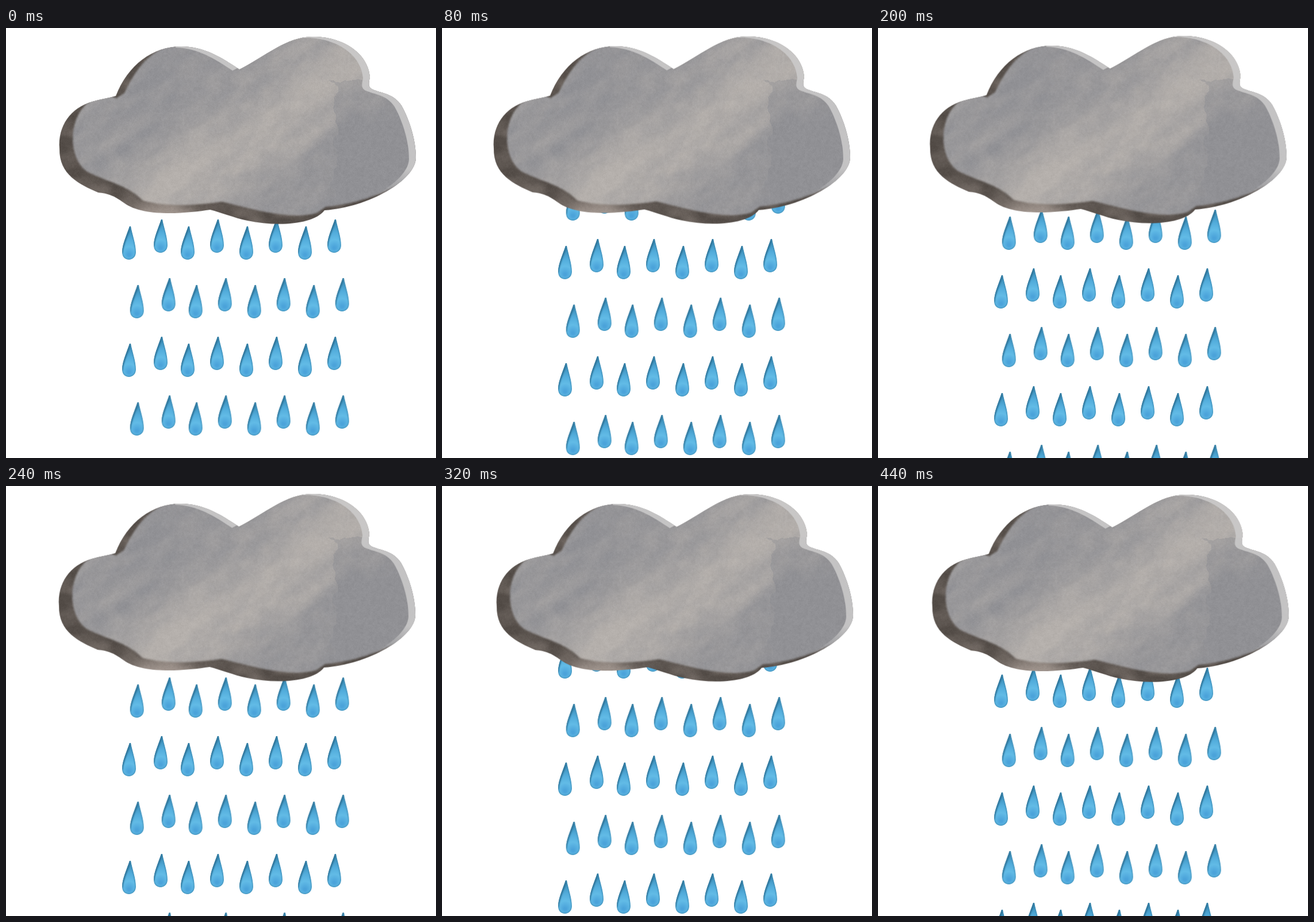
An HTML page with a canvas for the animation above (0.48 s loop, 748 by 748 pixels).

```html
<!DOCTYPE html>
<html lang="en">
<head>
<meta charset="utf-8">
<title>Rain cloud</title>
<style>
  html, body { margin: 0; width: 100%; height: 100%; overflow: hidden; background: #fff; }
  canvas { display: block; width: 748px; height: 748px; }
</style>
</head>
<body>
<canvas id="stage" width="748" height="748"></canvas>
<script>
const SIZE = 748, SKY = 360, LOOP = 480, STEP = 40, TAU = Math.PI * 2;
const ctx = document.getElementById('stage').getContext('2d');

const outline = new Path2D(`M93 210C90 170 112 139 150 128C163 124 178 122 191 118
  C212 64 255 32 305 32C345 32 376 52 406 72C450 50 488 15 533 15C588 15 630 45 633 85
  C631 96 629 103 638 107C655 114 674 114 688 135C702 160 713 195 713 225
  C713 265 630 312 554 317C535 342 472 346 420 335C396 330 375 321 355 316
  C315 322 240 330 205 304C187 291 178 288 160 286C128 272 92 255 93 210Z`);

// Lit front; it runs past the outline wherever no shaded side shows.
const face = new Path2D(`M140 132C104 165 110 240 150 254C185 270 213 275 238 300
  C280 312 335 308 375 302C420 312 490 335 540 322L556 311C610 306 650 290 692 268
  H800V-20H300L275 34C240 50 222 80 206 113L192 122L165 112Z`);

const dropShape = new Path2D('M-1 0H1C4 15 10 31 10 45C10 53 4 58 -2 58C-9 58 -14 53 -14 45C-14 32 -6 15 -1 0Z');

function layer(w, h) {
  const c = document.createElement('canvas');
  c.width = w;
  c.height = h;
  return c.getContext('2d');
}

function hash(x, y) {
  let h = Math.imul(x, 374761393) + Math.imul(y, 668265263);
  h = Math.imul(h ^ (h >>> 13), 1274126177);
  return ((h ^ (h >>> 16)) >>> 0) / 4294967296;
}

const clamp = v => Math.min(1, Math.max(0, v));
const mix = (a, b, t) => a + (b - a) * t;
const bell = (v, mid, width) => Math.exp(-(((v - mid) / width) ** 2));

// Smooth noise from -0.5 to 0.5
function noise(x, y) {
  const i = Math.floor(x), j = Math.floor(y);
  const u = (x - i) ** 2 * (3 - 2 * (x - i)), v = (y - j) ** 2 * (3 - 2 * (y - j));
  return mix(mix(hash(i, j), hash(i + 1, j), u), mix(hash(i, j + 1), hash(i + 1, j + 1), u), v) - .5;
}

// Fills a layer with a blend of two colours plus paper grain.
function paint(from, to, rule) {
  const c = layer(SIZE, SKY), img = c.createImageData(SIZE, SKY);
  for (let y = 0, i = 0; y < SKY; y++) {
    for (let x = 0; x < SIZE; x++, i += 4) {
      const t = clamp(rule(x, y)), grain = noise(x / 4, y / 4) * 6 + (hash(x, y) - .5) * 9;
      for (let k = 0; k < 3; k++) img.data[i + k] = mix(from[k], to[k], t) + grain;
      img.data[i + 3] = 255;
    }
  }
  c.putImageData(img, 0, 0);
  return c;
}

// A pale diagonal band between cool washes
function faceTone(x, y) {
  const along = x * .82 - y * .57, across = x * .57 + y * .82;
  const wobble = noise(x / 18, y / 18) * 22 + noise(x / 6, y / 6) * 6;
  const wash = x > 570 + wobble && y > 94 + wobble * .6 ? .4 : 0;
  return .12 + .75 * bell(across + wobble, 395, 82) - wash
    + noise(along / 75, across / 24) * .4 + noise(along / 24, across / 12) * .25;
}

// Dark underside, paler below the left lobe
function sideTone(x, y) {
  return .12 + .7 * bell(x, 275, 75) * bell(y, 318, 30) + noise(x / 24, y / 14) * .5;
}

function makeCloud() {
  const front = paint([145, 145, 149], [181, 176, 172], faceTone);
  front.globalCompositeOperation = 'destination-in';
  front.filter = 'blur(1.5px)';
  front.fill(face);

  const c = layer(SIZE, SKY);
  c.clip(outline);
  c.drawImage(paint([84, 77, 72], [160, 149, 142], sideTone).canvas, 0, 0);
  c.drawImage(front.canvas, 0, 0);

  // Light rim: what the same outline, moved left, leaves bare
  const rim = new Path2D();
  rim.rect(-50, -50, 900, 500);
  rim.addPath(outline, new DOMMatrix().translate(-12, 2));
  const fade = c.createLinearGradient(0, 245, 0, 292);
  fade.addColorStop(0, 'rgba(205,204,204,.85)');
  fade.addColorStop(1, 'rgba(205,204,204,0)');
  c.beginPath();
  c.rect(295, 0, SIZE, 292);
  c.clip();
  c.fillStyle = fade;
  c.fill(rim, 'evenodd');
  return c.canvas;
}

// Drop with its tip at (16, 2)
function makeDrop() {
  const c = layer(32, 64);
  c.translate(16, 2);
  c.clip(dropShape);
  const body = c.createRadialGradient(-2, 50, 2, 0, 40, 34);
  body.addColorStop(0, '#4ba3da');
  body.addColorStop(.3, '#62bbe6');
  body.addColorStop(.6, '#52acdb');
  body.addColorStop(1, '#3d8fba');
  c.fillStyle = body;
  c.fill(dropShape);
  c.filter = 'blur(1.2px)';
  c.strokeStyle = '#2b6d90';
  c.lineWidth = 6;
  c.stroke(new Path2D('M-1 -2C-5 14 -15 30 -16 46'));
  c.lineWidth = 2;
  c.strokeStyle = '#3a86ae';
  c.stroke(dropShape);
  return c.canvas;
}

const cloud = makeCloud(), drop = makeDrop();

function drawRow(row, step) {
  const y = Math.round(345 + row * 102.1 + step * 17.06);
  const left = row % 2 ? 229.7 : 216;
  for (let i = 0; i < 8; i++) {
    const nudge = i === 1 ? 4 : 0;
    ctx.drawImage(drop, left + i * 51 + nudge - 16, y - i % 2 * 12 - 2);
  }
}

function draw(time) {
  const step = Math.floor(time % LOOP / STEP), t = step * STEP;
  ctx.fillStyle = '#fff';
  ctx.fillRect(0, 0, SIZE, SIZE);
  for (let row = -2; row < 4; row++) drawRow(row, step);
  const dx = 3.2 * Math.cos((t - 370) / LOOP * TAU) - .4;
  const dy = .7 * Math.cos((t + 20) / LOOP * TAU) - .6;
  ctx.drawImage(cloud, dx, dy);
}

const start = performance.now();
function tick() {
  draw(performance.now() - start);
  requestAnimationFrame(tick);
}
tick();
</script>
</body>
</html>
```
